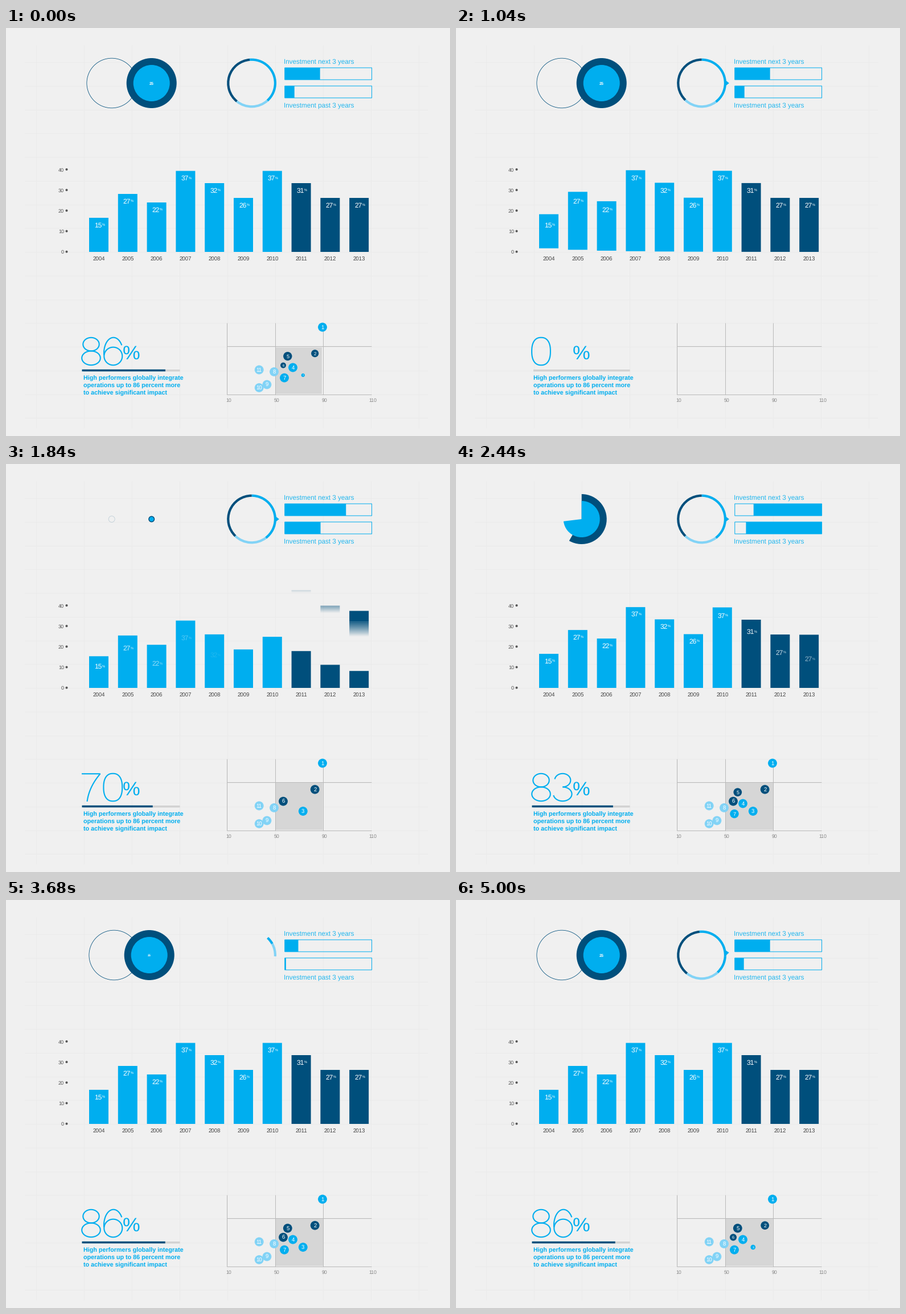
Animation, 780 px wide and 718 px high, one loop 5.04 s. Source, as a matplotlib script:

```python
import numpy as np
import matplotlib.pyplot as plt
from matplotlib.animation import FuncAnimation
from matplotlib.patches import Circle, Polygon, Rectangle, Wedge

W, H, DPI = 780, 718, 100
LOOP, STEP = 5040, 40
PT = 72 / DPI
BG, BRIGHT, NAVY, LIGHT = "#f0f0f0", "#00aeef", "#004f7c", "#82d3f6"

plt.rcParams["font.family"] = "Liberation Sans"
plt.rcParams["text.hinting"] = "no_hinting"
fig = plt.figure(figsize=(W / DPI, H / DPI), dpi=DPI, facecolor=BG)
ax = fig.add_axes([0, 0, 1, 1])
ax.set_xlim(0, W)
ax.set_ylim(H, 0)
ax.axis("off")


# ---- drawing helpers; y runs downwards, all sizes in pixels ----

def rect(x0, y0, x1, y1, color, alpha=1, z=2):
    return ax.add_patch(Rectangle((x0, y0), x1 - x0, y1 - y0, fc=color,
                                  lw=0, alpha=alpha, zorder=z, snap=False))


def disc(x, y, r, color, z=4):
    return ax.add_patch(Circle((x, y), r, fc=color, lw=0, zorder=z))


def stroke(pts, color, width, z=3):
    x, y = zip(*pts)
    return ax.plot(x, y, color=color, lw=width * PT, zorder=z,
                   solid_capstyle="butt", solid_joinstyle="miter")[0]


def label(x, y, s, px, color, ha="center", alpha=1, weight="normal", z=6):
    return ax.text(x, y + 0.36 * px, s, fontsize=px * PT, color=color, ha=ha,
                   va="baseline", alpha=alpha, weight=weight, zorder=z)


def sector(x, y, r, a0, a1, color, width=None, z=4):
    """Sector between two clockwise angles measured from twelve o'clock."""
    if a1 - a0 >= 359.9 and width is None:
        return [disc(x, y, r, color, z)]
    if a1 - a0 < 0.3:
        return []
    return [ax.add_patch(Wedge((x, y), r, a0 - 90, a1 - 90, width=width,
                               fc=color, lw=0, zorder=z))]


# ---- easing ----

def ramp(t, a, b):
    return min(max((t - a) / (b - a), 0), 1)


def smooth(t, a, b):
    x = ramp(t, a, b)
    return x * x * (3 - 2 * x)


def ease_out(t, a, b, power=3):
    return 1 - (1 - ramp(t, a, b)) ** power


# ---- thin numerals in a 35 x 50 cell ----

def arc(cx, cy, rx, ry, a0, a1, power=1.0):
    a = np.radians(np.linspace(a0, a1, 60))
    c, s = np.cos(a), np.sin(a)
    return list(zip(cx + rx * np.sign(c) * abs(c) ** power,
                    cy + ry * np.sign(s) * abs(s) ** power))


def bend(p, q, r):
    u = np.linspace(0, 1, 20)[:, None]
    p, q, r = map(np.array, (p, q, r))
    return [tuple(v) for v in (1 - u) ** 2 * p + 2 * u * (1 - u) * q + u * u * r]


SIX = [arc(18, 33.5, 16, 15.8, 0, 360), arc(18.5, 28, 16.8, 27.3, 172, 330)]
DIGITS = {
    "0": [arc(17.5, 25, 16.4, 24.3, 0, 360, 0.84)],
    "1": [[(6, 11), (18, 6), (20, 0.5), (20, 50)]],
    "2": [arc(17, 14.8, 15, 14, 185, 395)
          + bend((28, 24), (4, 37), (1.5, 49)) + [(34, 49)]],
    "3": [arc(17, 12.6, 14, 11.8, 190, 450), arc(17, 36.8, 16.2, 12.4, 270, 530)],
    "4": [[(34, 35), (1.5, 35), (26, 1), (26, 50)]],
    "5": [[(31, 1.2), (8, 1.2), (3.9, 25)] + arc(17.5, 33.5, 16, 15.7, 212, 525)],
    "6": SIX,
    "7": [[(1, 1.2)] + bend((33.5, 1.2), (14, 24), (10.5, 50))],
    "8": [arc(17.5, 12.6, 14.2, 11.8, 0, 360), arc(17.5, 36.8, 16.3, 12.4, 0, 360)],
    "9": [[(35 - x, 50 - y) for x, y in part] for part in SIX],
}


# ---- fixed parts ----

def draw_static():
    for x in 53 + 84 * np.arange(9):
        stroke([(x, 30), (x, 704)], "#eaeaea", 1, 0)
    for y in 60 + 41.75 * np.arange(16):
        stroke([(33, y), (741, y)], "#eaeaea", 1, 0)

    for y, text_y, s in ((70, 58, "next"), (102, 135.3, "past")):
        ax.add_patch(Rectangle((489.8, y), 152.8, 21, fc="none", ec=BRIGHT,
                               lw=PT, zorder=5, snap=False))
        label(488.5, text_y, f"Investment {s} 3 years", 11.6, BRIGHT, "left", 0.85)

    for k in range(5):
        y = 394 - 36.2 * k
        label(102, y, 10 * k, 9.2, "#555555", "right")
        disc(106.5, y - 0.3, 2, "#555555")
    for k in range(10):
        label(163 + 50.8 * k, 406, 2004 + k, 9.6, "#444444")

    rect(136, 601, 305.5, 604.5, "#d2d2d2")
    label(220.3, 570.5, "%", 34.5, BRIGHT)
    caption = ("High performers globally integrate",
               "operations up to 86 percent more",
               "to achieve significant impact")
    for k, line in enumerate(caption):
        label(135.5, 616.3 + 12.6 * k, line, 10.7, BRIGHT, "left", weight="bold")

    for x in (388, 472.5, 557):
        stroke([(x, 519), (x, 644.5)], "#b9b9b9", 1)
    for y in (560, 644.5):
        stroke([(388, y), (641.5, y)], "#b9b9b9", 1)
    for k, s in enumerate((10, 50, 90, 110)):
        label(391 + 84.3 * k, 654.5, s, 8.8, "#888888")


# ---- paired circles ----

def draw_circles(t):
    out = []
    if t < 1880:
        scale, gap, navy, bright = 1 - ramp(t, 1560, 1880), 35, 360, 360
        mark = 7.2 * scale
    else:
        scale, gap = 1, 35 * ease_out(t, 3265, 4071)
        navy, bright = 360 * smooth(t, 1840, 2920), 360 * smooth(t, 1840, 2750)
        mark = 7.2 * smooth(t, 3300, 3860)
    if scale < 0.02:
        return out
    mid = 220.7
    if gap > 0:
        out.append(ax.add_patch(Circle((mid - gap, 97), 43.8 * scale, fc="none",
                                       ec=NAVY, lw=0.8 * PT, zorder=2,
                                       alpha=0.1 + 0.9 * scale)))
    out += sector(mid + gap, 97, 44 * scale, 0, navy, NAVY, z=4)
    out += sector(mid + gap, 97, 32 * scale, 0, bright, BRIGHT, z=5)
    if mark > 1:
        out.append(label(mid + gap, 97, "25", mark, "white", weight="bold"))
    return out


# ---- ring with pointer ----

RING = ((0, 143, BRIGHT), (143, 224, LIGHT), (224, 360, NAVY))


def draw_ring(t):
    out, spin = [], 0
    if t < 1100 or t > 3400:
        late = t + LOOP if t < 1100 else t
        spin = min(0, 0.7 - 82.6 * np.exp((3680 - late) / 505))
    if t < 3400:
        lo, hi = 90 + 360 * smooth(t, 2820, 3380), 450
    else:
        lo, hi = 93 - 360 * smooth(t, 3520, 4200), 93
    for a0, a1, color in RING:
        for turn in (-720, -360, 0, 360):
            s0, s1 = max(a0 + spin + turn, lo), min(a1 + spin + turn, hi)
            out += sector(431.6, 97, 43.4, s0, s1, color, 4.2)
    tip = 90 + spin
    if lo <= tip + 1 and tip <= hi:
        a = np.radians([tip - 97, tip - 90, tip - 83])
        r = np.array([42, 48.3, 42])
        pts = np.column_stack((431.6 + r * np.cos(a), 97 + r * np.sin(a)))
        out.append(ax.add_patch(Polygon(pts, fc=BRIGHT, lw=0, zorder=4)))
    return out


# ---- investment bars: fill up, empty to the right, fill again ----

def draw_investment(t):
    if t < 3400:
        spans = ((153 * smooth(t, 2200, 3000), 62 + 91 * smooth(t, 1452, 2227), 70),
                 (153 * smooth(t, 2260, 3060), 17 + 136 * smooth(t, 1462, 2432), 102))
    else:
        spans = ((0, 62 * ease_out(t, 3540, 4480), 70),
                 (0, 16 * ease_out(t, 3640, 4480), 102))
    return [rect(489.7 + a, y, 489.7 + b, y + 21, BRIGHT)
            for a, b, y in spans if b - a > 0.2]


# ---- column chart ----

VALUES = (15, 27, 22, 37, 32, 26, 37, 31, 27, 27)
HEIGHTS = (60, 102, 87, 142.5, 121, 95, 142.5, 121, 95, 95)
BASE, FADE = 394, 26
LAST_LAG = 80  # the last column hangs back when leaving


def column_label(x, y, value, alpha):
    if alpha < 0.02:
        return []
    return [label(x + 9, y, value, 12, "white", "left", alpha),
            label(x + 22.3, y, "%", 5.6, "white", "left", alpha)]


def leaving_column(u, x, height, color):
    """A column that drifts up while a soft edge wipes it from below."""
    foot = BASE - 53 / (1 + np.exp((1210 - u) / 85))
    head = foot - height
    share = ease_out(u, 1070, 1520, 1.3)
    if share >= 1:
        return []
    edge = foot - share * (height + FADE)
    out = [rect(x, head, x + 34, edge, color)] if edge > head else []
    for k in range(FADE // 2):
        y0, y1 = max(edge + 2 * k, head), min(edge + 2 * k + 2, foot)
        if y1 > y0:
            out.append(rect(x, y0, x + 34, y1, color, 1 - (2 * k + 1) / FADE))
    return out


def draw_columns(t):
    out = []
    for i, (value, height) in enumerate(zip(VALUES, HEIGHTS)):
        x, color = 146 + 50.8 * i, NAVY if i > 6 else BRIGHT
        text_y = BASE - height + 12.3
        u = t - 50 * i - LAST_LAG * (i == 9)
        out += leaving_column(u, x, height, color)
        out += column_label(x, text_y, value, 1 - ramp(u, 1060, 1270))

        v = t - 42 * i
        grown = 1.03 * np.exp(-np.exp(min((1475 - v) / 139, 50))) - 0.03
        if grown > 0:
            out.append(rect(x, BASE - grown * height, x + 34, BASE, color))
        w = t - 86 * i
        drop = 54 * (1 - smooth(w, 1400, 2000))
        out += column_label(x, text_y + drop, value, smooth(w, 1380, 1900))
    return out


# ---- percentage counter ----

def draw_counter(t):
    if t < 1000:
        share = 1 - smooth(t, 60, 900)
    else:
        decay = np.interp(t, (1110, 1520, 1840, 2440, 3340), (0, 1.02, 1.68, 3.35, 6))
        share = 1 - np.exp(-decay)
    out = []
    for k, ch in enumerate(str(round(86 * share))):
        for part in DIGITS[ch]:
            pts = [(132 + 38.3 * k + x, 544 + y) for x, y in part]
            out.append(stroke(pts, BRIGHT, 2.1))
    if share > 0:
        out.append(rect(133.5, 600.8, 133.5 + 146.5 * share ** 0.8, 604.3, NAVY, z=3))
    return out


# ---- scatter: number, x, y in order of entry ----

NODES = ((10, 444.7, 633), (11, 444.7, 601.5), (6, 487, 593.6), (9, 458.4, 627.5),
         (3, 521.8, 611), (8, 471, 605), (1, 556, 526.5), (2, 542.7, 572.7),
         (4, 504, 597.5), (7, 489, 615.6), (5, 494.8, 577.6))
LEAVE_ORDER = (3, 6, 2, 5, 4, 1, 7, 8, 9, 11, 10)
SECOND_WAVE = (4, 7, 5)


def draw_scatter(t):
    late = t + LOOP if t < 1100 else t
    size = ease_out(late, 1160, 1980) * (1 - smooth(late, 4980, 5620))
    out = []
    if size > 0.01:
        out.append(rect(473, 644 - 84 * size, 473 + 84 * size, 644, "#d6d6d6", z=1))
    for k, (n, x, y) in enumerate(NODES):
        enter = 1270 + 28 * k + 750 * (n in SECOND_WAVE)
        leave = 4812 + 62 * LEAVE_ORDER.index(n)
        s = ease_out(late, enter, enter + 240) * (1 - smooth(late, leave, leave + 400))
        if s > 0.06:
            color = LIGHT if n > 7 else NAVY if n in (2, 5, 6) else BRIGHT
            out += [disc(x, y, 7.9 * s, color), label(x, y, n, 9.6 * s, "white")]
    return out


draw_static()
PARTS = (draw_circles, draw_ring, draw_investment,
         draw_columns, draw_counter, draw_scatter)
live = []


def draw(i):
    while live:
        live.pop().remove()
    for part in PARTS:
        live.extend(part(i * STEP))
    return live


anim = FuncAnimation(fig, draw, frames=LOOP // STEP, interval=STEP,
                     repeat=True, repeat_delay=0, blit=False)
plt.show()
```
